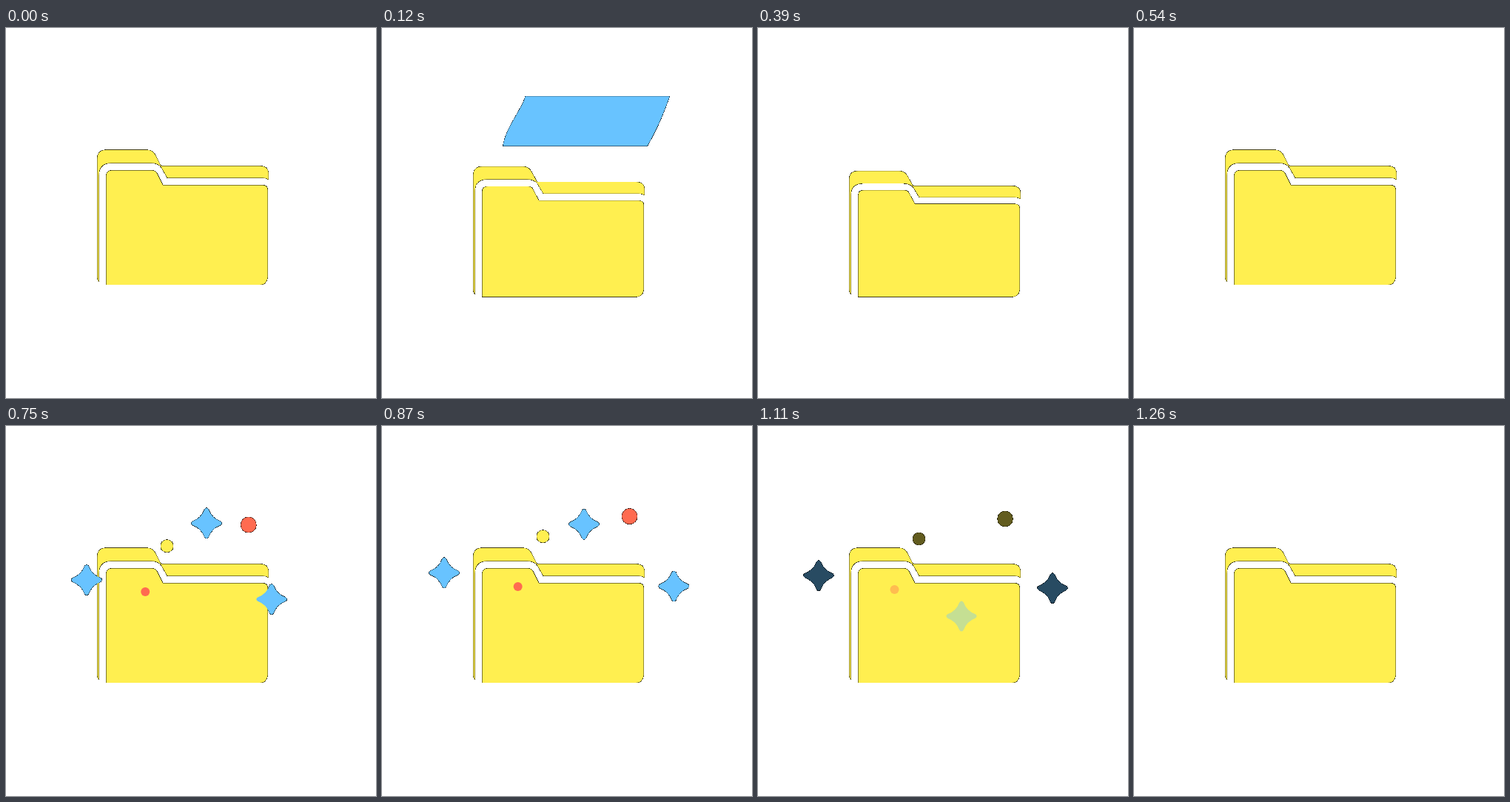
These frames come from a looping animation (500 px wide and 500 px high, 1.35 s). An HTML page with a canvas:

```html
<!DOCTYPE html>
<html lang="en">
<head>
<meta charset="utf-8">
<title>Folder</title>
<style>
  html, body { margin: 0; width: 100%; height: 100%; overflow: hidden; background: #fff; }
  canvas { display: block; width: 500px; height: 500px; }
</style>
</head>
<body>
<canvas id="stage" width="500" height="500"></canvas>
<script>
const LOOP = 1350, STEP = 30, SIZE = 500;
const YELLOW = '#ffef50', BLUE = '#68c3ff', RED = '#ff6b50';
const ctx = document.getElementById('stage').getContext('2d', { willReadFrequently: true });

const back = new Path2D(`M123.4 336 V177 Q123.4 164.7 135.5 164.7 H191 Q198 164.7 202 172
  L209.5 186.4 H343 Q354.7 186.4 354.7 197 V205 Q352 202.6 347 202.6 H218 L210 188.5
  Q206 182.6 196 182.6 H142 Q125.6 182.6 125.6 199 V343 Q123.4 341 123.4 336 Z`);
const front = new Path2D(`M135.5 347 V200 Q135.5 192.5 143 192.5 H197 Q202 192.5 204 196.5
  L212 212.4 H347 Q353.6 212.4 353.6 219 V337 Q352 347 343 347 Z`);
const star = new Path2D();
for (let i = 0; i < 4; i++) {
  const c = [1, 0, -1, 0][i], s = [0, 1, 0, -1][i];
  const at = (x, y) => [x * c - y * s, x * s + y * c];
  if (!i) star.moveTo(2.7, -18.7);
  star.quadraticCurveTo(...at(7, -7), ...at(18.7, -2.7));
  star.quadraticCurveTo(...at(22.5, 0), ...at(18.7, 2.7));
}
const dot = new Path2D();
dot.arc(0, 0, 1, 0, 7);

const clamp = v => Math.max(0, Math.min(1, v));
const span = (t, a, b) => clamp((t - a) / (b - a));
const smooth = p => (1 - Math.cos(Math.PI * p)) / 2;
const easeOut = p => 1 - (1 - p) ** 3;
const mix = (a, b, p) => a + (b - a) * p;

// time, x, y, width, bottom shift, left bends, right bends
const sheet = [
  [30, 261, 56, 195, -24, 2, -16, -2, -10],
  [120, 193.7, 92.3, 195, -30.2, -4, -26, -6, -15],
  [240, 166, 148.7, 186, -21, -22, -34, -22, -34],
  [300, 158, 190, 186, -4, -10, -12, -10, -12],
  [360, 152, 240, 186, 0, 0, 0, 0, 0],
  [420, 152, 280, 186, 0, 0, 0, 0, 0]
];

// Smooth curve through the rows of a table
function sample(rows, t) {
  let i = 0;
  while (i < rows.length - 2 && t >= rows[i + 1][0]) i++;
  const a = rows[i], b = rows[i + 1], d = b[0] - a[0], u = span(t, a[0], b[0]);
  const slope = (k, c) => {
    const p = rows[Math.max(0, k - 1)], n = rows[Math.min(rows.length - 1, k + 1)];
    return (n[c] - p[c]) / (n[0] - p[0]) * d;
  };
  return a.map((v, c) => mix(v, b[c], u * u * (3 - 2 * u)) +
    u * (1 - u) * ((1 - u) * slope(i, c) - u * slope(i + 1, c)));
}

function drawSheet(t) {
  if (t < 30 || t >= 420) return;
  const [, x, y, w, d, l1, l2, r1, r2] = sample(sheet, t), h = 67.1, r = x + w;
  ctx.beginPath();
  ctx.moveTo(x, y);
  ctx.lineTo(r, y);
  ctx.bezierCurveTo(r + r1, y + 17, r + r2, y + 41, r + d, y + h);
  ctx.lineTo(x + d, y + h);
  ctx.bezierCurveTo(x + l2, y + 41, x + l1, y + 17, x, y);
  ctx.fillStyle = BLUE;
  ctx.fill();
}

function drawFolder(t) {
  const rise = 1 - smooth(span(t, 240, 540));
  const drop = 32.6 * smooth(span(t, 0, 240)) * rise;
  const squash = 0.135 * smooth(span(t, 60, 240)) * rise;
  const panel = path => {
    ctx.save();
    ctx.translate(0, 347 + drop);
    ctx.scale(1, 1 - squash);
    ctx.translate(0, -347);
    ctx.fillStyle = YELLOW;
    ctx.fill(path);
    ctx.restore();
  };
  panel(back);
  drawSheet(t);
  panel(front);
}

// shape, colour, scale, start x, y, end x, y
const bits = [
  [star, BLUE, 1, 233, 256, 80.5, 197],
  [star, BLUE, 1, 182, 322, 399.5, 214],
  [dot, RED, 10.5, 294, 190, 335.5, 120.5],
  [dot, YELLOW, 8.5, 217.5, 227, 217.5, 147.5],
  [dot, RED, 6, 211, 259, 183, 216]
];

function drawBit(path, color, size, x, y) {
  ctx.save();
  ctx.translate(x, y);
  ctx.scale(size, size);
  ctx.fillStyle = color;
  ctx.fill(path);
  ctx.restore();
}

function drawBurst(t) {
  if (t <= 570 || t >= 1260) return;
  const go = easeOut(span(t, 570, 990)), sag = smooth(span(t, 990, 1110));
  const grow = easeOut(span(t, 570, 690));
  const alpha = 1 - span(t, 870, 1260);
  ctx.globalAlpha = alpha;
  for (const [path, color, size, x0, y0, x1, y1] of bits) {
    const tint = size > 10 && alpha < 0.8 ? YELLOW : color;
    drawBit(path, tint, size * grow,
      mix(x0, x1, go) - Math.sign(x1 - x0) * 1.5 * sag, mix(y0, y1, go) + 5 * sag);
  }
  const y = t < 810 ? mix(291, 104, smooth(span(t, 570, 810)))
                    : mix(104, 257, smooth(span(t, 810, 1020)));
  drawBit(star, BLUE, grow, mix(268, 275, span(t, 570, 990)), y);
  ctx.globalAlpha = 1;
}

// Every touched pixel turns solid over black, giving the hard dark rims
function flatten() {
  const img = ctx.getImageData(0, 0, SIZE, SIZE), px = img.data;
  for (let i = 0; i < px.length; i += 4) {
    const a = px[i + 3];
    if (a === 255) continue;
    for (let c = i; c < i + 3; c++) px[c] = a < 10 ? 255 : px[c] * a / 255;
    px[i + 3] = 255;
  }
  ctx.putImageData(img, 0, 0);
}

function render(t) {
  ctx.clearRect(0, 0, SIZE, SIZE);
  drawFolder(t);
  drawBurst(t);
  flatten();
}

const start = performance.now();
let shown = -1;
function tick() {
  const t = Math.floor((performance.now() - start) % LOOP / STEP) * STEP;
  if (t !== shown) render(shown = t);
  requestAnimationFrame(tick);
}
tick();
</script>
</body>
</html>
```
